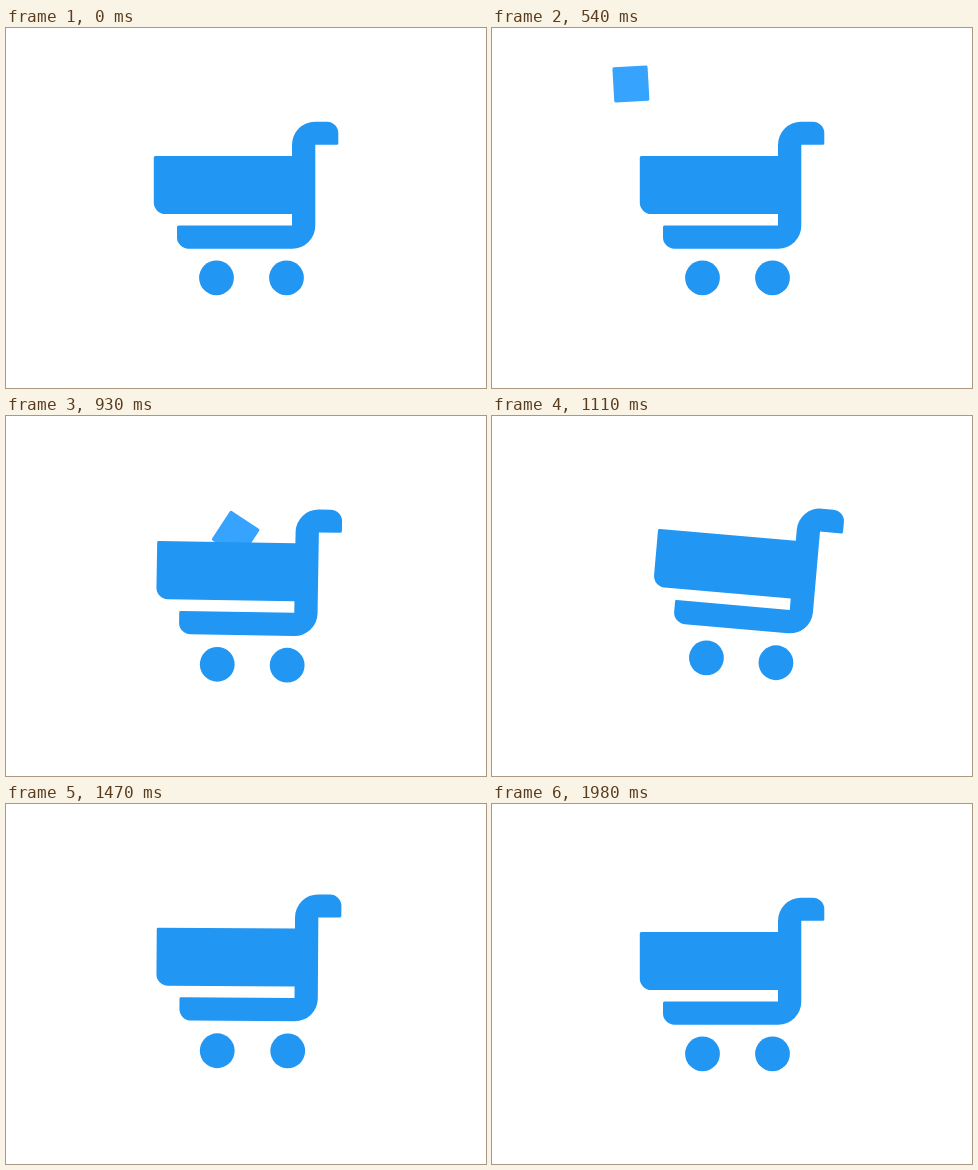
Write an HTML page with a canvas that moves like this. It is 480x360 px and loops after 2.4 s.

```html
<!DOCTYPE html>
<html lang="en">
<head>
<meta charset="utf-8">
<title>Cart</title>
<style>
html, body { margin: 0; width: 100%; height: 100%; overflow: hidden; background: #fff; }
canvas { display: block; }
</style>
</head>
<body>
<canvas id="stage" width="480" height="360"></canvas>
<script>
const ctx = document.getElementById('stage').getContext('2d');
const LOOP = 2400, STEP = 30;
const BLUE = '#2196f3', LIGHT = '#36a3ff';
const RAD = Math.PI / 180;

// Poses: body angle and offset, then the offset of each wheel
const REST = [0, 0, 0, 0, 0, 0, 0];
const TIPPED = [5.2, 14, -7.7, 4.1, -8.3, 3.6, -3.2];
const BACK = [-2.1, -3.2, -1.7, -1, -0.4, 0, -2.7];
const KEYS = [[0, REST], [780, REST], [1200, TIPPED], [1240, TIPPED],
              [1650, BACK], [1980, REST], [LOOP, REST]];

const ease = p => p < 0.5 ? 4 * p ** 3 : 1 - 4 * (1 - p) ** 3;

function poseAt(t) {
  const i = KEYS.findIndex(k => k[0] > t);
  const [t0, a] = KEYS[i - 1], [t1, b] = KEYS[i];
  const p = ease((t - t0) / (t1 - t0));
  return a.map((v, n) => v + (b[n] - v) * p);
}

function makeBody() {
  const p = new Path2D();
  p.moveTo(149.5, 128);
  p.lineTo(286, 128);
  p.lineTo(286, 117);
  p.arcTo(286, 93.7, 309, 93.7, 23);
  p.arcTo(332.3, 93.7, 332.3, 105, 11.5);
  p.arcTo(332.3, 116.7, 309, 116.7, 1.5);
  p.lineTo(309.3, 116.7);
  p.arcTo(309.3, 220.7, 286, 220.7, 23);
  p.arcTo(171, 220.7, 171, 209, 11.5);
  p.arcTo(171, 197.4, 286, 197.4, 1.5);
  p.lineTo(286, 197.4);
  p.lineTo(286, 186);
  p.arcTo(147.8, 186, 147.8, 175, 11.5);
  p.arcTo(147.8, 128, 150, 128, 1.5);
  p.closePath();
  return p;
}
const body = makeBody();

function drawBox(t) {
  if (t > 1035) return;
  const s = t - 540;
  const x = 138.9 + 0.2637 * s - 0.0000795 * s * s;
  const y = 53 + 28 * Math.abs((t - 323) / 457) ** 3;
  ctx.save();
  ctx.translate(x, y);
  ctx.rotate((-3.2 + 0.0933 * s) * RAD);
  ctx.fillStyle = LIGHT;
  ctx.beginPath();
  ctx.roundRect(-17.6, -17.6, 35.2, 35.2, 1.5);
  ctx.fill();
  ctx.restore();
}

function drawWheel(x, y) {
  ctx.beginPath();
  ctx.arc(x, y, 17.4, 0, 2 * Math.PI);
  ctx.fill();
}

function drawCart(t) {
  const [angle, dx, dy, lx, ly, rx, ry] = poseAt(t);
  ctx.fillStyle = BLUE;
  ctx.save();
  ctx.translate(240 + dx, 180 + dy);
  ctx.rotate(angle * RAD);
  ctx.translate(-240, -180);
  ctx.fill(body);
  ctx.restore();
  drawWheel(210.5 + lx, 249.8 + ly);
  drawWheel(280.5 + rx, 249.8 + ry);
}

const start = performance.now();
function frame() {
  const now = Math.max(0, performance.now() - start) % LOOP;
  const t = Math.floor(now / STEP) * STEP;
  ctx.fillStyle = '#fff';
  ctx.fillRect(0, 0, 480, 360);
  drawBox(t);
  drawCart(t);
  requestAnimationFrame(frame);
}
frame();
</script>
</body>
</html>
```
